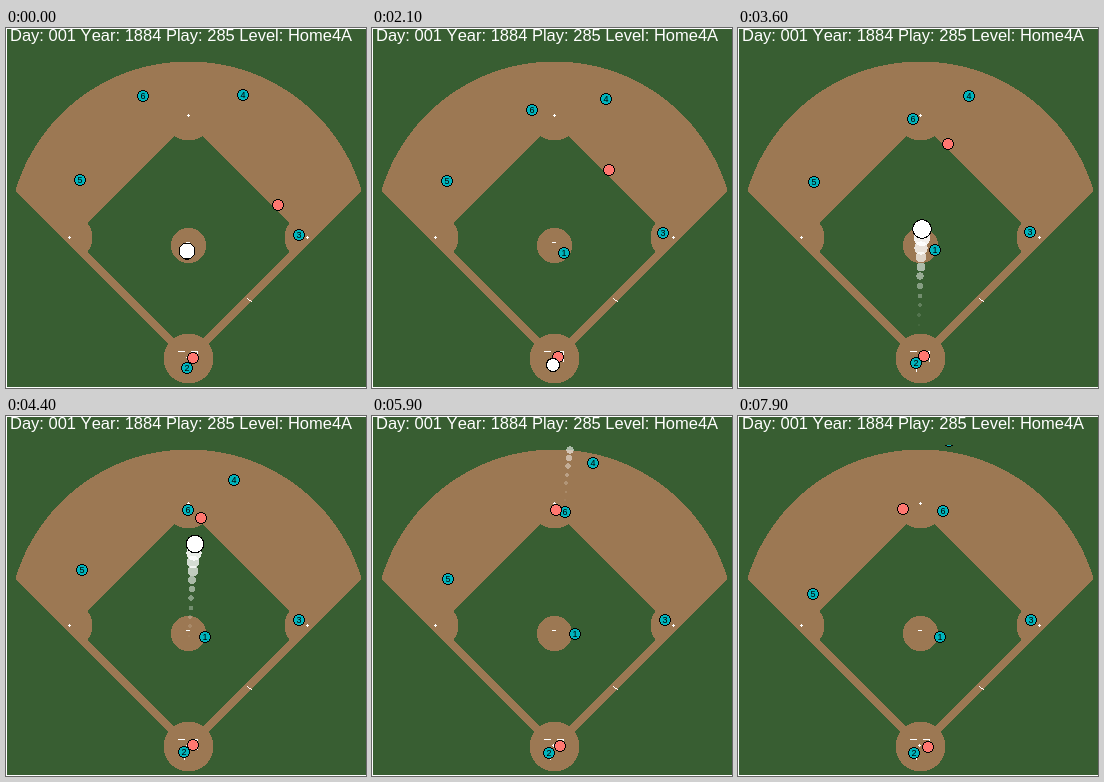
These frames come from a looping animation (360 by 360 pixels, 8 s). An HTML page with a canvas:

```html
<!DOCTYPE html>
<html lang="en">
<head>
<meta charset="utf-8">
<title>Baseball play</title>
<style>
html, body { margin: 0; width: 100%; height: 100%; overflow: hidden; background: #385e32; }
canvas { display: block; width: 360px; height: 360px; }
</style>
</head>
<body>
<canvas id="stage" width="360" height="360"></canvas>
<script>
const SIZE = 360, LOOP = 8000, STEP = 100, HIT = 2200;
const GRASS = "#385e32", DIRT = "#9c7853", TEAL = "#00b4bc", CORAL = "#ff7770";
const FONT = '"Liberation Sans", Arial, sans-serif';
const ctx = document.getElementById("stage").getContext("2d");

// Each path is a few [seconds, x, y] points.
const players = [
  { label: "1", path: [[0, 181, 226], [2.8, 195, 224], [6.7, 205, 216], [7.9, 202, 221]] },
  { label: "2", path: [[0, 181, 340], [2.8, 179, 335], [6.7, 176, 337]] },
  { label: "3", path: [[0, 293, 207], [0.9, 290, 205], [4.6, 293, 204]] },
  { label: "4", path: [[0, 237, 67], [1.3, 235, 71], [2.8, 233, 71], [4.4, 228, 64], [7.9, 211, 25]] },
  { label: "5", path: [[0, 74, 152], [4.6, 76, 154], [7.9, 75, 178]] },
  { label: "6", path: [[0, 137, 68], [2.8, 168, 87], [4.4, 182, 94], [6.7, 199, 97], [7.9, 205, 95]] },
  { path: [[0, 272, 177], [1.3, 252, 156], [4.4, 195, 102], [6.7, 178, 89], [7.9, 165, 93]] },
  { path: [[0, 187, 330], [3.6, 186, 328], [7.9, 190, 331]] }
];

function pointAt(path, s) {
  const i = path.findIndex(p => p[0] > s);
  const b = i < 0 ? path[path.length - 1] : path[i];
  if (i < 0) return [b[1], b[2]];
  const a = path[i - 1];
  const u = (s - a[0]) / (b[0] - a[0]);
  return [1, 2].map(k => Math.round(a[k] + (b[k] - a[k]) * u));
}

function ballAt(t) {
  if (t < HIT) {
    const u = Math.min(1, t / 800);
    return { x: 181, y: 223 + 114 * u, r: 8.5 - 1.5 * u };
  }
  const s = (t - HIT) / 1000;
  return { x: 181 + 1.6 * s * s, y: 337 - 101 * s + 2.75 * s * s, r: 10 - s * s / 6 };
}

// Disc made of whole pixel rows, for hard edges.
function disc(x, y, r, color) {
  ctx.fillStyle = color;
  x = Math.round(x);
  y = Math.round(y);
  for (let row = -Math.round(r); row < Math.round(r); row++) {
    const w = Math.round(Math.sqrt(Math.max(0, r * r - (row + 0.5) ** 2)));
    ctx.fillRect(x - w, y + row, 2 * w, 1);
  }
}

function ringDisc(x, y, r, color) {
  disc(x, y, r, "#000");
  disc(x, y, r - 1, color);
}

function isDirt(x, y) {
  const dx = Math.abs(x - 182);
  const near = (cx, cy, r) => Math.hypot(dx - cx, y - cy) < r;
  if (near(0, 330, 25) || near(0, 217, 17.5)) return true;
  if (dx + y > 335) return false;
  if (near(119, 209, 23) || near(0, 87, 25)) return true;
  if (dx + Math.abs(y - 209) < 116) return false;
  return y > 162 || near(0, 213.5, 180.5);
}

function makeField() {
  const field = document.createElement("canvas");
  field.width = field.height = SIZE;
  const g = field.getContext("2d");
  g.fillStyle = GRASS;
  g.fillRect(0, 0, SIZE, SIZE);
  g.fillStyle = DIRT;
  for (let y = 0; y < SIZE; y++) {
    for (let x = 0; x < SIZE; x++) {
      if (isDirt(x, y)) g.fillRect(x, y, 1, 1);
    }
  }

  g.fillStyle = "#fff";
  for (const [x, y] of [[63, 209], [301, 209], [182, 87], [181, 329]]) {
    g.fillRect(x - 1, y, 3, 1);
    g.fillRect(x, y - 1, 1, 3);
  }
  g.fillRect(180, 214, 4, 1);
  g.fillRect(172, 323, 7, 1);
  g.fillRect(185, 323, 7, 1);
  g.fillRect(191, 324, 1, 10);
  g.fillRect(178, 340, 1, 4);
  for (let i = 0; i < 5; i++) g.fillRect(241 + i, 270 + Math.round(i * 0.8), 1, 1);

  g.font = "16.5px " + FONT;
  g.fontKerning = "none";
  g.fillText("Day: 001 Year: 1884 Play: 285 Level: Home4A", 4, 13);

  g.fillRect(0, 0, SIZE, 1);
  g.fillRect(0, 0, 1, SIZE);
  g.fillRect(0, SIZE - 1, SIZE, 1);
  return field;
}

function drawPlayer({ label, path }, t) {
  const [x, y] = pointAt(path, t / 1000);
  ringDisc(x, y, 6, label ? TEAL : CORAL);
  if (!label) return;
  ctx.fillStyle = "#000";
  ctx.font = "9px " + FONT;
  ctx.textAlign = "center";
  ctx.fillText(label, x, y + 3);
}

function drawBall(t) {
  for (let age = 10; age > 0; age--) {
    if (t < age * STEP) continue;
    const { x, y, r } = ballAt(t - age * STEP);
    ctx.globalAlpha = (1 - age / 11) ** 1.2;
    disc(x, y, Math.max(0.6, r * 0.82 ** age), "#fff");
  }
  ctx.globalAlpha = 1;
  const { x, y, r } = ballAt(t);
  ringDisc(x, y, r, "#fff");
}

const field = makeField();

function draw(t) {
  ctx.drawImage(field, 0, 0);
  ctx.save();
  ctx.beginPath();
  ctx.rect(0, 29, SIZE, SIZE - 29);
  ctx.clip();
  players.forEach(p => drawPlayer(p, t));
  drawBall(t);
  ctx.restore();
}

const start = performance.now();
function tick() {
  const t = (performance.now() - start) % LOOP;
  draw(Math.floor(t / STEP) * STEP);
  requestAnimationFrame(tick);
}
tick();
</script>
</body>
</html>
```
